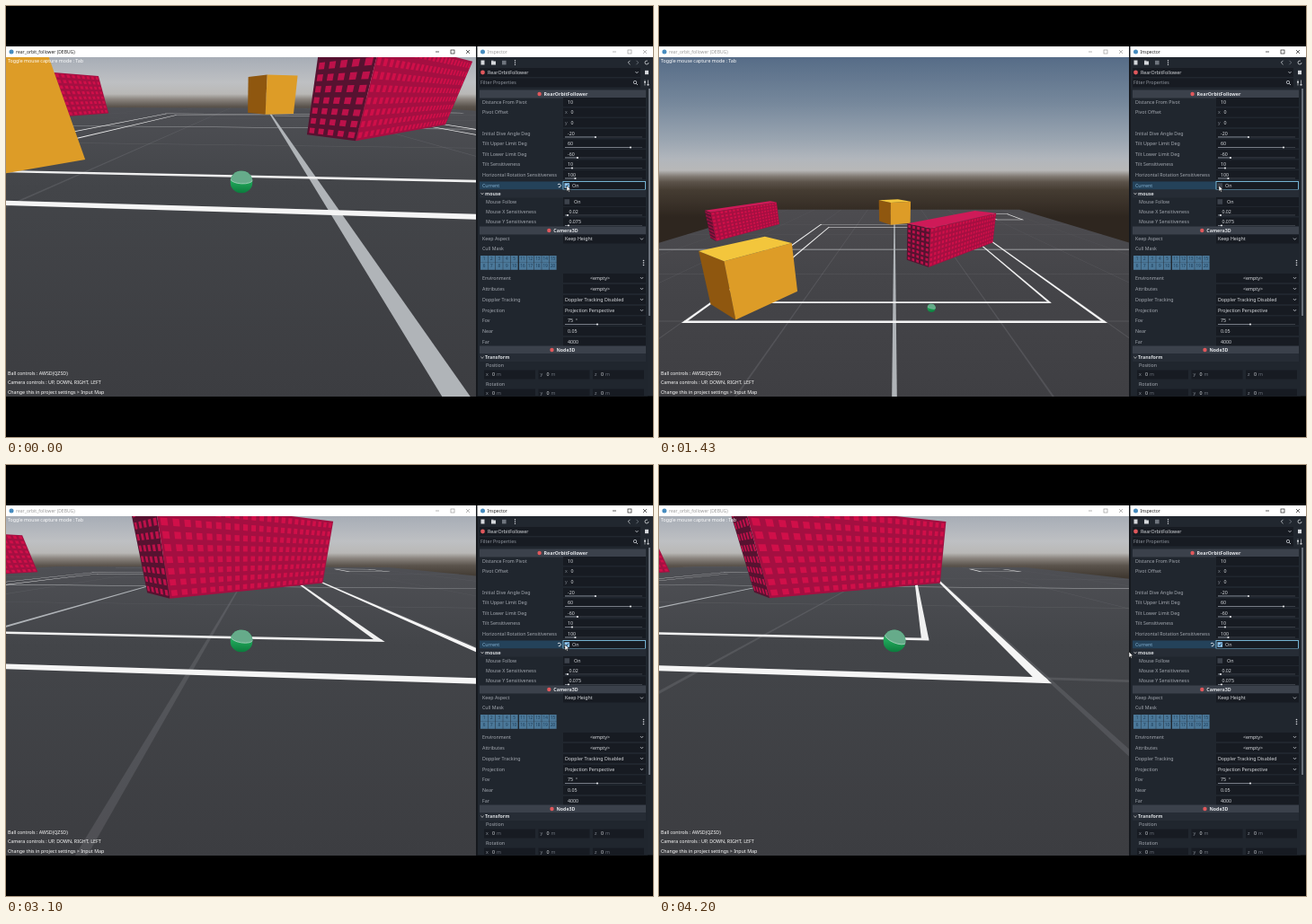
These frames come from a looping animation (720x480 px, 4230 ms). An HTML page with a canvas:

```html
<!DOCTYPE html>
<html lang="en">
<head>
<meta charset="utf-8">
<title>Camera switch</title>
<style>
html, body { margin: 0; width: 100%; height: 100%; overflow: hidden; background: #000; }
canvas { display: block; }
</style>
</head>
<body>
<canvas id="stage" width="720" height="480"></canvas>
<script>
const ctx = document.getElementById('stage').getContext('2d');
const LOOP = 4230, CLICKS = [520, 2560], VIEW_OFF = 530, VIEW_ON = 2600;
const FOCAL = 246, CX = 262, CY = 246, BALL_R = 0.4;
const FONT = '"Noto Sans", "Open Sans", sans-serif';
const BALL_KEYS = [[0, -2.85], [600, -0.45], [2230, 7.75], [2800, 10.1], [3100, 11.4], [3600, 13.5], [4230, 15.75]];
const CURSOR_KEYS = [[0, 624, 200], [700, 624, 200], [2200, 622, 200], [3800, 622, 200], [4200, 523, 208], [4230, 523, 208]];

function sample(keys, t, col = 1) {
  const i = Math.max(1, keys.findIndex(k => k[0] >= t));
  const a = keys[i - 1], b = keys[i];
  return a[col] + (b[col] - a[col]) * (t - a[0]) / (b[0] - a[0]);
}

// ---- basic drawing ----
function rect(x, y, w, h, color) {
  ctx.fillStyle = color;
  ctx.fillRect(x, y, w, h);
}
function disc(x, y, r, color) {
  ctx.fillStyle = color;
  ctx.beginPath();
  ctx.arc(x, y, r, 0, 7);
  ctx.fill();
}
function path(points, color, width = 0.8) {
  ctx.strokeStyle = color;
  ctx.lineWidth = width;
  ctx.beginPath();
  points.forEach(([x, y]) => ctx.lineTo(x, y));
  ctx.stroke();
}
function text(str, x, y, color = '#a3a8b0', size = 5.3, weight = 400, align = 'left') {
  ctx.font = `${weight} ${size}px ${FONT}`;
  ctx.textAlign = align;
  ctx.textBaseline = 'middle';
  ctx.fillStyle = color;
  ctx.fillText(str, x, y);
}
function gradient(y0, y1, stops) {
  const g = ctx.createLinearGradient(0, y0, 0, y1);
  stops.forEach(([y, color]) => g.addColorStop((y - y0) / (y1 - y0), color));
  return g;
}

// ---- 3D scene; z grows toward the viewer ----
let cam;
function makeCam(x, z, h, pitch, yaw) {
  const r = Math.PI / 180;
  return { x, z, h, sp: Math.sin(pitch * r), cp: Math.cos(pitch * r), sy: Math.sin(yaw * r), cy: Math.cos(yaw * r) };
}
function toCam([x, y, z]) {
  const dx = x - cam.x, dz = cam.z - z, down = cam.h - y;
  const depth = dz * cam.cy - dx * cam.sy;
  return [dx * cam.cy + dz * cam.sy, down * cam.cp - depth * cam.sp, depth * cam.cp + down * cam.sp];
}
const toScreen = ([x, y, z]) => [CX + FOCAL * x / z, CY + FOCAL * y / z];

function project(points) {
  const near = 0.1, out = [];
  const p = points.map(toCam);
  p.forEach((a, i) => {
    const b = p[(i + 1) % p.length];
    if (a[2] > near) out.push(a);
    if (a[2] > near !== b[2] > near) {
      const k = (near - a[2]) / (b[2] - a[2]);
      out.push(a.map((v, j) => v + (b[j] - v) * k));
    }
  });
  return out.map(toScreen);
}
function addPoly(pts) {
  pts.forEach(([x, y], i) => i ? ctx.lineTo(x, y) : ctx.moveTo(x, y));
  ctx.closePath();
}
function poly(points, color) {
  ctx.fillStyle = color;
  ctx.beginPath();
  addPoly(project(points));
  ctx.fill();
}
function patch(x0, z0, x1, z1, color) {
  poly([[x0, 0, z0], [x1, 0, z0], [x1, 0, z1], [x0, 0, z1]], color);
}
const alongX = (z, x0, x1, w, color) => patch(x0, z - w / 2, x1, z + w / 2, color);
const alongZ = (x, z0, z1, w, color) => patch(x - w / 2, z0, x + w / 2, z1, color);
function frame(x0, z0, x1, z1, w, color) {
  for (const z of [z0, z1]) alongX(z, x0 - w / 2, x1 + w / 2, w, color);
  for (const x of [x0, x1]) alongZ(x, z0, z1, w, color);
}
function area(p) {
  return p.reduce((s, [x, y], i) => {
    const [u, v] = p[(i + 1) % p.length];
    return s + x * v - u * y;
  }, 0);
}

const ORANGE = { left: '#8f570f', right: '#dd9c27', top: '#f3c63c' };
const CRIMSON = { left: '#561230', right: '#a40f41', top: '#cf1a58', dots: ['#bd114a', '#d00f49'] };

// a: front corner, b: left corner, c: right corner
function box(a, b, c, skin) {
  const H = 6, d = [b[0] + c[0] - a[0], b[1] + c[1] - a[1]];
  const sides = [[b, a, skin.left], [a, c, skin.right], [c, d, skin.left], [d, b, skin.right]];
  sides.forEach(([p, q, color], side) => {
    const at = (u, v) => [p[0] + (q[0] - p[0]) * u, v * H, p[1] + (q[1] - p[1]) * u];
    const quad = (u0, v0, u1, v1) => [at(u0, v0), at(u1, v0), at(u1, v1), at(u0, v1)];
    const face = quad(0, 0, 1, 1);
    if (area(project(face)) >= 0) return;
    poly(face, color);
    if (!skin.dots) return;
    const rows = 8, cols = Math.round(Math.hypot(q[0] - p[0], q[1] - p[1]) / 0.84);
    ctx.fillStyle = skin.dots[side % 2];
    ctx.beginPath();
    for (let i = 0; i < cols; i++) for (let j = 0; j < rows; j++)
      addPoly(project(quad((i + 0.22) / cols, (j + 0.22) / rows, (i + 0.78) / cols, (j + 0.78) / rows)));
    ctx.fill();
  });
  if (cam.h > H) poly([a, c, d, b].map(([x, z]) => [x, H, z]), skin.top);
}

function ball(x, y, r, spin) {
  ctx.save();
  ctx.translate(x, y);
  ctx.beginPath();
  ctx.arc(0, 0, r, 0, 7);
  ctx.clip();
  rect(-r, -r, 2 * r, 2 * r, gradient(-r, r, [[-r, '#37b070'], [0, '#1fa458'], [r, '#0b7a3c']]));
  ctx.rotate(0.2 + 0.2 * Math.sin(spin));
  ctx.fillStyle = '#66ab8a';
  ctx.beginPath();
  ctx.ellipse(0, -r * 0.25, r, r * 0.4, 0, 0, Math.PI);
  ctx.rect(-r, -r, 2 * r, r * 0.75);
  ctx.fill();
  ctx.strokeStyle = '#9fceb7';
  ctx.lineWidth = r * 0.07;
  ctx.beginPath();
  ctx.ellipse(0, -r * 0.25, r, r * 0.4, 0, 0, Math.PI);
  ctx.stroke();
  ctx.restore();
}

function scene(t, follow) {
  const bx = sample(BALL_KEYS, t), bz = 18.65 - t * 0.0001;
  cam = follow ? makeCam(bx + 0.49, bz + 7.39, 2.94, 30.7, 3.8) : makeCam(0, 38.2, 13.73, 13.93, 0);

  ctx.save();
  ctx.beginPath();
  ctx.rect(0, 57, 523, 378);
  ctx.clip();
  rect(0, 57, 523, 378, follow
    ? gradient(57, 125, [[57, '#a7adb6'], [85, '#bec0c3'], [98, '#b9b8b6'], [104, '#8a847e'], [112, '#5a534c'], [125, '#3f3830']])
    : gradient(57, 235, [[57, '#566c87'], [107, '#75879b'], [149, '#9aa5b1'], [170, '#b1b6bc'], [183, '#b8b8b8'], [190, '#7f7871'], [196, '#5c534a'], [205, '#453c32'], [235, '#2e261f']]));

  const floor = follow
    ? gradient(100, 435, [[100, '#505156'], [200, '#434549'], [435, '#3c3d41']])
    : gradient(225, 435, [[225, '#4d4c50'], [300, '#454549'], [435, '#3f3f43']]);
  patch(-47, -44, 47, 45, floor);
  for (let k = -40; k <= 40; k += 10) {
    alongZ(k, -44, 45, 0.14, 'rgba(210,215,220,.12)');
    alongX(k, -47, 47, 0.14, 'rgba(210,215,220,.12)');
  }
  alongX(0, -47, 47, 0.3, 'rgba(225,228,230,.7)');
  alongZ(0, -20, 45, 0.32, '#b0b4b8');
  frame(-19.8, -20.1, 19.8, 20.1, 0.34, '#f5f5f5');
  frame(-16.8, -16.9, 16.8, 16.9, 0.3, '#f0f0f0');
  frame(30.3, -35, 38, -26, 0.6, '#e4e4e4');

  box([-36.4, -4.9], [-39.4, -7.2], [-31.2, -20.2], CRIMSON);
  box([-1, -19.3], [-4.4, -24.2], [4.4, -21.6], ORANGE);
  box([5.1, 7.8], [2, 4.9], [19.7, -4], CRIMSON);
  box([-15.2, 19.8], [-19.7, 17.2], [-11.5, 14.6], ORANGE);

  if (follow) ball(262, 196, 12.5, bx / BALL_R);
  else {
    const p = toCam([bx, BALL_R, bz]), [x, y] = toScreen(p);
    ball(x, y, FOCAL * BALL_R / p[2] + 0.3, bx / BALL_R);
  }

  text('Toggle mouse capture mode : Tab', 2, 61, '#fff');
  text('Ball controls : AWSD(QZSD)', 2, 409, '#fff');
  text('Camera controls : UP, DOWN, RIGHT, LEFT', 2, 419.5, '#fff');
  text('Change this in project settings > Input Map', 2, 430, '#fff');
  ctx.restore();
}

// ---- windows and inspector ----
function titleBar(x, w, label, active) {
  const ink = active ? '#222' : '#9a9a9a', right = x + w;
  rect(x, 45, w, 12, '#fff');
  disc(x + 6, 51, 2.5, '#478cbf');
  text(label, x + 11, 51.2, ink, 5);
  path([[right - 45, 51], [right - 41, 51]], ink, 0.7);
  ctx.strokeRect(right - 28, 49, 4, 4);
  path([[right - 11, 49], [right - 7, 53]], ink, 0.7);
  path([[right - 7, 49], [right - 11, 53]], ink, 0.7);
}
const VALUE = '#d9dce0', DARK = '#171b22', NAME = 'RearOrbitFollower';

function header(y, label) {
  rect(527, y - 4.5, 185, 9, '#3b414b');
  text(label, 623, y, '#e2e4e8', 5.3, 700, 'center');
  disc(623 - ctx.measureText(label).width / 2 - 5, y, 2.2, '#e0585c');
}
function section(y, label) {
  rect(527, y - 4.5, 185, 9, '#262c35');
  path([[528.5, y - 1], [530, y + 1], [531.5, y - 1]], '#ccc', 0.7);
  text(label, 533, y, VALUE, 5.3, 700);
}
function chevron(x, y) {
  path([[x - 1.6, y - 1], [x, y + 0.8], [x + 1.6, y - 1]], '#c4c8ce', 0.8);
}
function row(y, label, value, indent = 0) {
  text(label, 530 + indent, y);
  rect(620, y - 5, 92, 10, DARK);
  if (value) text(value, 625, y, VALUE);
}
function slider(y, label, value, knob, indent) {
  row(y, label, value, indent);
  rect(622, y + 3.6, 86, 0.7, '#4b515a');
  rect(622, y + 3.6, knob - 622, 0.7, '#9299a3');
  disc(knob, y + 4, 1.1, '#e4e6e9');
}
function choice(y, label, value) {
  row(y, label);
  text(value, 622, y, VALUE);
  chevron(707.5, y);
}
function vector(y) {
  ['x', 'y', 'z'].forEach((axis, i) => {
    const x = 532 + i * 60.5;
    rect(x, y - 5, 57, 10, DARK);
    text(axis, x + 2, y, '#858b94');
    text('0', x + 9, y, VALUE);
    text('m', x + 14, y, '#686e77');
  });
}
function checkbox(y, on) {
  rect(621.5, y - 2.8, 5.6, 5.6, on ? '#8cc4ee' : '#3d434c');
  if (on) path([[622.8, y], [624, y + 1.4], [626, y - 1.5]], '#17324a', 0.9);
}

function toolbar() {
  const ink = '#d5d8dc';
  rect(528.5, 60.5, 4, 5, ink);
  rect(540, 61.5, 5, 4, ink);
  rect(540, 60.7, 2.5, 1, ink);
  rect(552, 60.8, 4.6, 4.6, '#6f757e');
  for (const y of [60.8, 63, 65.2]) disc(566.5, y, 0.7, ink);
  path([[694.5, 60.8], [692.3, 63], [694.5, 65.2]], ink);
  path([[701.5, 60.8], [703.7, 63], [701.5, 65.2]], '#777d86');
  ctx.strokeStyle = ink;
  ctx.beginPath();
  ctx.arc(713, 63, 2, 0, 5.2);
  ctx.stroke();

  rect(527, 69, 179, 10, DARK);
  disc(530.5, 74, 2.4, '#e0585c');
  text(NAME, 536, 74, VALUE);
  chevron(702, 74);
  rect(711, 71.8, 4, 4.4, ink);
  rect(527, 80.5, 179, 10, DARK);
  text('Filter Properties', 528, 85.5, '#8f959e');
  ctx.beginPath();
  ctx.arc(700, 85, 1.7, 0, 7);
  ctx.stroke();
  path([[701.2, 86.2], [703, 88]], ink);
  for (const [x, y] of [[711, 84], [714.5, 87]]) {
    path([[x, 82.5], [x, 88.5]], ink, 0.7);
    rect(x - 1, y, 2, 1.4, ink);
  }
}

function inspector(on) {
  rect(525, 57, 195, 377.5, '#21272f');
  toolbar();
  rect(525, 92, 189, 342.5, '#20262e');
  rect(715, 92, 2, 253, '#69707a');
  header(98, NAME);

  row(107, 'Distance From Pivot', '10');
  row(118.5, 'Pivot Offset');
  rect(620, 125, 92, 10, DARK);
  [118.5, 130].forEach((y, i) => {
    text('xy'[i], 622, y, '#7c828b');
    text('0', 628.5, y, VALUE);
  });
  slider(142, 'Initial Dive Angle Deg', '-20', 656);
  slider(153.5, 'Tilt Upper Limit Deg', '60', 695);
  slider(165, 'Tilt Lower Limit Deg', '-60', 636);
  slider(176.5, 'Tilt Sensitiveness', '10', 630);
  slider(188, 'Horizontal Rotation Sensitiveness', '100', 633.5);

  rect(527, 195.5, 93, 9, '#24425a');
  row(200, '');
  text('Current', 530, 200, '#86b4d6');
  checkbox(200, on);
  text('On', 630, 200, VALUE);
  ctx.strokeStyle = '#7fc3e6';
  ctx.lineWidth = 0.9;
  ctx.strokeRect(620, 195.5, 91.5, 9);
  if (on) {
    ctx.strokeStyle = '#e4e8ec';
    ctx.beginPath();
    ctx.arc(615.5, 200, 1.8, -2.6, 2);
    ctx.stroke();
  }

  section(209, 'mouse');
  row(218, 'Mouse Follow', '', 4);
  checkbox(218, false);
  text('On', 632, 218, VALUE);
  slider(229, 'Mouse X Sensitiveness', ' 0.02', 625, 4);
  slider(240.5, 'Mouse Y Sensitiveness', ' 0.075', 626, 4);

  header(250, 'Camera3D');
  choice(259.5, 'Keep Aspect', 'Keep Height');
  text('Cull Mask', 530, 270.5);
  for (let i = 0; i < 20; i++) {
    const block = Math.floor(i / 10), x = 528 + block * 43 + (i % 5) * 8.4, y = 278 + Math.floor(i % 10 / 5) * 8;
    rect(x, y, 8, 7.8, '#4b7899');
    text(i + 1, x + 4, y + 4, '#1d3c57', 4.6, 400, 'center');
  }
  for (const y of [283.5, 286, 288.5]) disc(709.5, y, 0.8, VALUE);
  for (const [y, label] of [[303, 'Environment'], [315, 'Attributes']]) {
    choice(y, label, '');
    text('<empty>', 661, y, VALUE, 5.3, 400, 'center');
  }
  choice(327, 'Doppler Tracking', 'Doppler Tracking Disabled');
  choice(339, 'Projection', 'Projection Perspective');
  slider(350.5, 'Fov', '75  °', 658);
  row(362, 'Near', '0.05');
  row(374, 'Far', '4000');

  header(383, 'Node3D');
  section(391.5, 'Transform');
  text('Position', 534, 400);
  vector(410.5);
  text('Rotation', 534, 421);
  ctx.save();
  ctx.beginPath();
  ctx.rect(525, 420, 195, 14);
  ctx.clip();
  vector(431.5);
  ctx.restore();
}

function pointer(t) {
  for (const c of CLICKS) {
    const age = (t - c) / 300;
    if (age < 0 || age > 1) continue;
    ctx.globalAlpha = 1 - age;
    ctx.strokeStyle = '#6fe0e8';
    ctx.lineWidth = 1.4;
    ctx.beginPath();
    ctx.arc(625, 201.5, 5 + 3 * age, 0, 7);
    ctx.stroke();
    ctx.globalAlpha = 1;
  }
  ctx.save();
  ctx.translate(sample(CURSOR_KEYS, t), sample(CURSOR_KEYS, t, 2));
  ctx.beginPath();
  addPoly([[0, 0], [0, 6.4], [1.5, 5.1], [2.4, 7.2], [3.4, 6.7], [2.5, 4.7], [4.5, 4.5]]);
  ctx.fillStyle = '#fff';
  ctx.strokeStyle = '#111';
  ctx.lineWidth = 0.5;
  ctx.fill();
  ctx.stroke();
  ctx.restore();
}

function draw(now) {
  const t = now % LOOP, follow = t < VIEW_OFF || t >= VIEW_ON, gameActive = t < CLICKS[0];
  rect(0, 0, 720, 480, '#000');
  scene(t, follow);
  titleBar(0, 523, 'rear_orbit_follower (DEBUG)', gameActive);
  rect(523, 45, 2, 390, '#15181d');
  titleBar(524.5, 195.5, 'Inspector', !gameActive);
  inspector(follow);
  pointer(t);
}

const start = performance.now();
(function tick() {
  draw(performance.now() - start);
  requestAnimationFrame(tick);
})();
</script>
</body>
</html>
```
